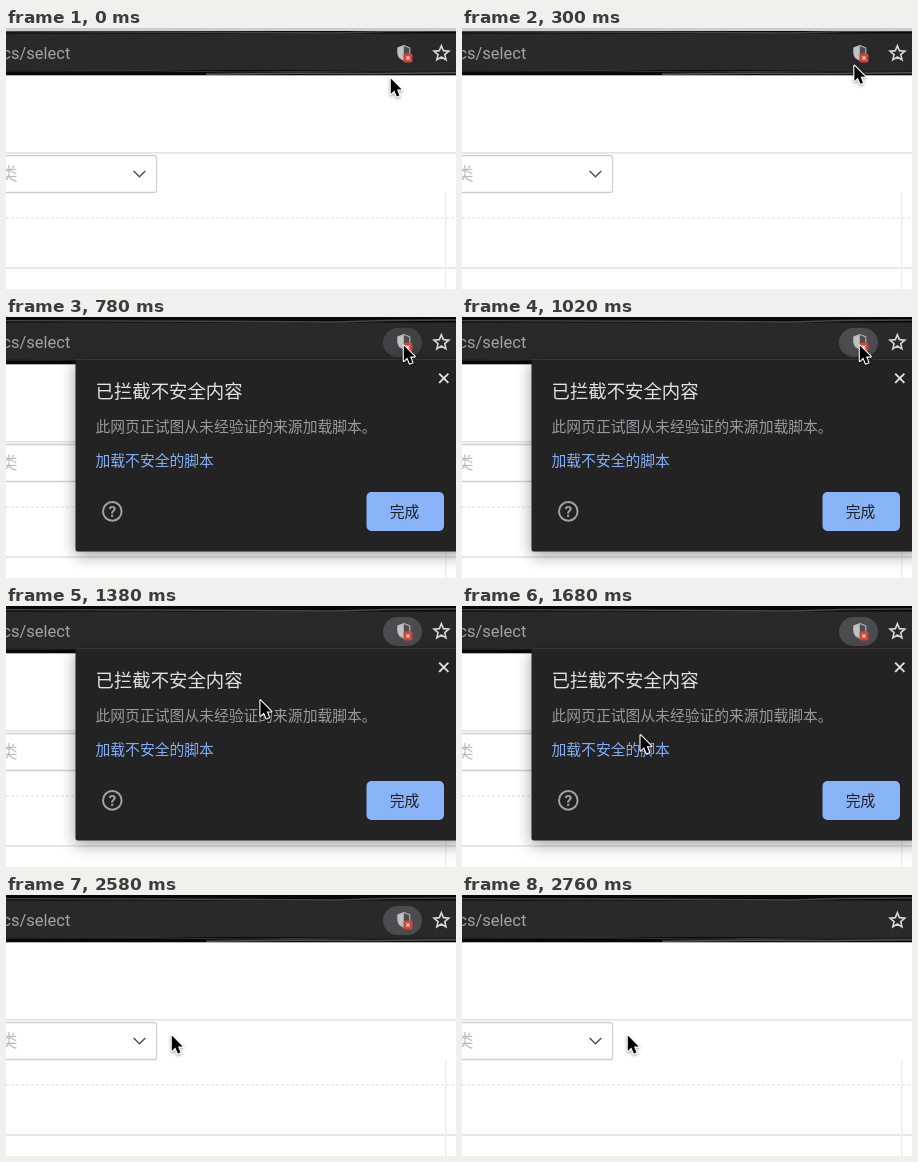
Recreate the animation shown at these times as an HTML page with a canvas. Size 450x261 px, loop 3000 ms.

```html
<!DOCTYPE html>
<html lang="zh-CN">
<head>
<meta charset="utf-8">
<title>Blocked content prompt</title>
<style>
  html, body { margin: 0; width: 100%; height: 100%; overflow: hidden; background: #fff; }
  canvas { display: block; width: 450px; height: 261px; }
</style>
</head>
<body>
<canvas id="stage"></canvas>
<script>
const W = 450, H = 261, LOOP = 3000, STEP = 60;
const POPUP_IN = 780, POPUP_OUT = 2580, HAND_IN = 1860, SHIELD_OUT = 2760;
const CJK = '"Noto Sans CJK SC", "Noto Sans CJK", sans-serif';
const LATIN = 'Roboto, sans-serif';

const canvas = document.getElementById('stage');
const ctx = canvas.getContext('2d');
const ratio = window.devicePixelRatio || 1;
canvas.width = W * ratio;
canvas.height = H * ratio;
ctx.scale(ratio, ratio);

const easeInOut = p => p * p * (3 - 2 * p);
const easeOut = p => 1 - Math.pow(1 - p, 2.6);

const moves = [
  { start: 0, end: 540, from: [384, 50], to: [397, 28], ease: easeInOut },
  { start: 1200, end: 1740, from: [397, 28], to: [177, 129], ease: easeOut },
  { start: 1740, end: 1980, from: [177, 129], to: [165, 140], ease: easeInOut }
];

function pointerAt(t) {
  const move = moves.filter(m => t >= m.start).pop();
  const p = move.ease(Math.min(1, (t - move.start) / (move.end - move.start)));
  return move.from.map((v, i) => v + (move.to[i] - v) * p);
}

function rect(x, y, w, h, color) {
  ctx.fillStyle = color;
  ctx.fillRect(x, y, w, h);
}

function roundRect(x, y, w, h, r) {
  ctx.beginPath();
  ctx.roundRect(x, y, w, h, r);
}

function line(points, color, width, dash = []) {
  ctx.beginPath();
  points.forEach(([x, y]) => ctx.lineTo(x, y));
  ctx.strokeStyle = color;
  ctx.lineWidth = width;
  ctx.setLineDash(dash);
  ctx.stroke();
  ctx.setLineDash([]);
}

function cross(x, y, r, color, width) {
  line([[x - r, y - r], [x + r, y + r]], color, width);
  line([[x + r, y - r], [x - r, y + r]], color, width);
}

function text(str, x, y, font, color, align = 'left') {
  ctx.font = font;
  ctx.fillStyle = color;
  ctx.textAlign = align;
  ctx.fillText(str, x, y);
}

function drawPage() {
  rect(0, 0, W, H, '#fff');
  rect(0, 124, W, 1.7, '#e4e4e4');
  roundRect(-10, 127.5, 160.5, 37, 2);
  ctx.fillStyle = '#fff';
  ctx.fill();
  ctx.strokeStyle = '#d0d0d0';
  ctx.lineWidth = 1.3;
  ctx.stroke();
  text('类', -5.5, 151.6, '17px ' + CJK, '#bdbdbd');
  line([[127.7, 143], [133.5, 148.8], [139.3, 143]], '#505050', 1.5);
  line([[0, 190]  , [W, 190]], '#dedede', 1.2, [3, 2]);
  rect(0, 239, W, 2, '#e8e8e8');
  rect(439, 164, 1.5, 97, '#eee');
}

function drawShield() {
  const outline = new Path2D('M397.8 17.5 L403.8 19.8 V24.6 C403.8 28.6 401.5 31 397.8 32.2 C394 31 391.8 28.6 391.8 24.6 V19.8 Z');
  ctx.fillStyle = '#4b4d50';
  ctx.fill(outline);
  ctx.save();
  ctx.clip(outline);
  rect(390, 16, 7.8, 18, '#c0c2c4');
  ctx.restore();
  ctx.strokeStyle = '#b4b6b8';
  ctx.lineWidth = 1.1;
  ctx.stroke(outline);
  roundRect(397.6, 25.6, 8.8, 8.8, 1.5);
  ctx.fillStyle = '#d5443a';
  ctx.fill();
  cross(402, 30, 1.6, '#f4dcda', 1.2);
}

function drawStar() {
  ctx.beginPath();
  for (let i = 0; i < 10; i++) {
    const r = i % 2 ? 3.5 : 7.8;
    const a = i * Math.PI / 5 - Math.PI / 2;
    ctx.lineTo(435.4 + r * Math.cos(a), 25.5 + r * Math.sin(a));
  }
  ctx.closePath();
  ctx.strokeStyle = '#d6d7d9';
  ctx.lineWidth = 1.6;
  ctx.stroke();
}

function drawToolbar(t) {
  rect(0, 0, W, 47.3, '#080808');
  rect(0, 5.5, W, 36.5, '#29292a');
  line([[0, 3.6], [200, 4.2], [330, 5], [380, 3.5], [W, 3]], '#464646', 1.4);
  line([[0, 43], [140, 42.6], [230, 44], [365, 42.8], [W, 43]], '#383838', 1.2);
  line([[200, 46.3], [290, 45.2], [370, 45.6], [W, 44.8]], '#555', 1.5);
  if (t < POPUP_IN) rect(0, 0, W, 3, '#c8cfcb');

  text('cs/select', 64.3, 30.7, '16.5px ' + LATIN, '#a2a3a4', 'right');
  if (t >= POPUP_IN && t < SHIELD_OUT) {
    roundRect(377, 11, 39, 29, 14.5);
    ctx.fillStyle = t < POPUP_IN + 2 * STEP ? '#404246' : '#4a4c4f';
    ctx.fill();
  }
  if (t < SHIELD_OUT) drawShield();
  drawStar();
}

function drawPopup() {
  ctx.save();
  ctx.shadowColor = 'rgba(0,0,0,0.38)';
  ctx.shadowBlur = 16 * ratio;
  ctx.shadowOffsetY = 4 * ratio;
  roundRect(69.5, 42, 390, 192.4, 2);
  ctx.fillStyle = '#232324';
  ctx.fill();
  ctx.restore();
  line([[70, 42.5], [W, 42.5]], '#363637', 1);

  text('已拦截不安全内容', 89.5, 80.8, '500 18.4px ' + CJK, '#e0e1e3');
  text('此网页正试图从未经验证的来源加载脚本。', 89.5, 115, '500 14.8px ' + CJK, '#96999d');
  text('加载不安全的脚本', 89.5, 148.5, '500 14.8px ' + CJK, '#84aef2');
  cross(437.8, 61.3, 4.6, '#e2e3e5', 1.9);

  ctx.beginPath();
  ctx.arc(106.3, 194.4, 9.3, 0, Math.PI * 2);
  ctx.strokeStyle = '#a0a3a7';
  ctx.lineWidth = 2;
  ctx.stroke();
  text('?', 106.3, 199.8, '700 15.5px ' + LATIN, '#a0a3a7', 'center');

  roundRect(360.5, 175, 77.5, 39, 5);
  ctx.fillStyle = '#8ab4f8';
  ctx.fill();
  text('完成', 398.5, 199.5, '500 14.8px ' + CJK, '#202124', 'center');
}

const arrow = new Path2D('M0 0 V15.3 L3.5 12 L6 18 L8.6 16.9 L6.2 11 H10.9 Z');
const hand = new Path2D('M-1.7 1.5 C-1.7 -0.6 1.6 -0.6 1.7 1.5 V6.2 C2.6 5 4.6 5.4 4.8 7 ' +
  'C5.8 6 7.4 6.6 7.6 8 C8.6 7.3 10 8 10 9.4 V13 C10 15.5 8.7 16.5 8.5 19.3 H0 ' +
  'C-0.4 16.8 -3.2 14.6 -5.2 11.2 C-6.2 9.4 -4.2 8.3 -2.9 9.6 L-1.7 10.8 Z');

function drawPointer(t) {
  const [x, y] = pointerAt(t);
  const isHand = t >= HAND_IN && t < POPUP_OUT;
  const shape = isHand ? hand : arrow;
  ctx.save();
  ctx.translate(x + (isHand ? 1.5 : 0.8), y + (isHand ? -0.5 : 0.6));
  ctx.lineJoin = 'round';
  ctx.shadowColor = 'rgba(0,0,0,0.35)';
  ctx.shadowBlur = 3 * ratio;
  ctx.shadowOffsetY = 1.5 * ratio;
  ctx.strokeStyle = isHand ? '#000' : '#fff';
  ctx.lineWidth = isHand ? 2 : 2.2;
  ctx.stroke(shape);
  ctx.shadowColor = 'transparent';
  ctx.fillStyle = isHand ? '#fff' : '#000';
  ctx.fill(shape);
  if (isHand) [2, 4.6, 7.2].forEach(dx => line([[dx, 11.5], [dx, 16]], '#000', 1));
  ctx.restore();
}

function draw(now) {
  const t = Math.floor((now % LOOP) / STEP) * STEP;
  drawPage();
  drawToolbar(t);
  if (t >= POPUP_IN && t < POPUP_OUT) drawPopup();
  drawPointer(t);
}

const begin = performance.now();
function tick() {
  draw(performance.now() - begin);
  requestAnimationFrame(tick);
}
tick();
</script>
</body>
</html>
```
